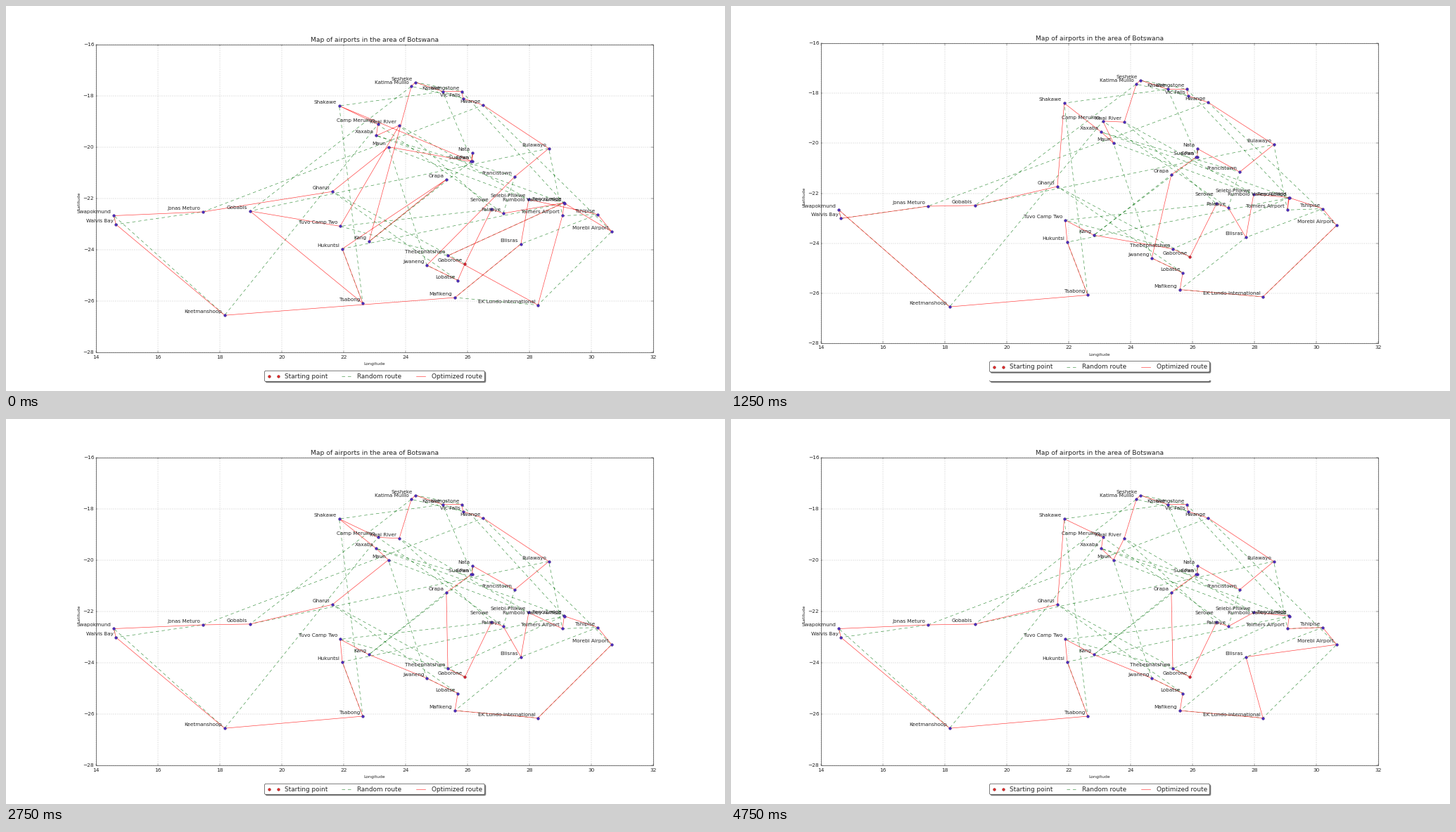
A matplotlib script that plays this animation: 1022 by 548 pixels, repeating every 5000 ms.

```python
import matplotlib.pyplot as plt
from matplotlib.animation import FuncAnimation
from matplotlib.patches import FancyBboxPatch, Rectangle

WIDTH, HEIGHT, DPI = 1022, 548, 64
SHORT_HEIGHT = 533
PT = 72 / DPI
LEFT, RIGHT = 0.125 * WIDTH, 0.9 * WIDTH
RED, GREEN, INK = "#ff3a3a", "#3f9445", "#262626"

# Listed in the order of the best tour.
AIRPORTS = [
    ("Gaborone", 25.92, -24.55), ("Serowe", 26.78, -22.42),
    ("Palapye", 27.16, -22.58), ("Selebi-Phikwe", 27.98, -22.04),
    ("Feno Lodge", 29.11, -22.17), ("Rumbolo Valley Airfield", 29.13, -22.18),
    ("Tolmers Airport", 29.07, -22.67), ("Tshipise", 30.21, -22.62),
    ("Morebi Airport", 30.66, -23.29), ("Ellisras", 27.73, -23.77),
    ("EK Lundo International", 28.28, -26.15), ("Mafikeng", 25.60, -25.86),
    ("Lobatse", 25.69, -25.19), ("Jwaneng", 24.69, -24.60),
    ("Kang", 22.82, -23.68), ("Tuvo Camp Two", 21.89, -23.08),
    ("Hukuntsi", 21.96, -23.96), ("Tsabong", 22.62, -26.08),
    ("Keetmanshoop", 18.16, -26.55), ("Walvis Bay", 14.65, -23.01),
    ("Swapokmund", 14.58, -22.67), ("Jonas Meturo", 17.46, -22.52),
    ("Gobabis", 18.98, -22.49), ("Ghanzi", 21.64, -21.73),
    ("Shakawe", 21.86, -18.39), ("Camp Merulino", 23.11, -19.11),
    ("Xaxaba", 23.06, -19.55), ("Maun", 23.45, -19.99),
    ("Kwai River", 23.80, -19.15), ("Katima Mulilo", 24.19, -17.63),
    ("Sesheke", 24.32, -17.47), ("Kasane", 25.20, -17.83),
    ("Livingstone", 25.82, -17.83), ("Vic Falls", 25.86, -18.10),
    ("Hwange", 26.51, -18.36), ("Bulawayo", 28.63, -20.05),
    ("Francistown", 27.53, -21.15), ("Nata", 26.17, -20.22),
    ("Sowa", 26.16, -20.56), ("Sua Pan", 26.12, -20.56),
    ("Orapa", 25.32, -21.26), ("Thebephatshwa", 25.37, -24.23),
]
LABEL_LIFT = {"Serowe": 11.5}


def tour(*parts):
    """Join single stops and inclusive (first, last) runs into one list."""
    stops = []
    for part in parts:
        if isinstance(part, tuple):
            first, last = part
            step = 1 if last > first else -1
            stops += range(first, last + step, step)
        else:
            stops.append(part)
    return stops


def rewire(stops, *run):
    """Put a contiguous run of stops into a new order."""
    start = min(stops.index(stop) for stop in run)
    return stops[:start] + list(run) + stops[start + len(run):]


RANDOM_ROUTE = tour(0, 23, 12, 13, 27, 3, 28, 1, 15, 41, 4, 32, 30, 33, 29,
                    22, 35, 6, 7, 9, 11, 10, 8, 34, 21, 19, 20, 18, 25, 2,
                    36, 26, 5, 16, 17, 24, 31, 38, 37, 39, 14, 40)

rough = tour(0, 12, 13, (36, 29), 14, 40, 16, 17, 22, 15, 28, 26, 25, 24,
             38, 37, 39, 27, 23, (21, 18), 11, 9, 3, 7, 8, 5, 6, 10, 41,
             4, 2, 1)
west = tour(11, 14, 23, (15, 18), 22, (19, 21), (24, 28))
untangled = tour(0, 12, 13, 41, 10, 6, 4, 5, 3, 7, 8, 2, 9) + west + tour(
    39, (29, 38), 40, 1)
crossed = tour(0, 12, 13, 41, 10, (3, 8), 2, 9) + west + tour(
    39, 33, (29, 32), 34, 37, 35, 36, 38, 40, 1)
opened = tour(0, 1, 2, 9, (3, 8), (10, 13), 41, 14, 23, (15, 18), 22,
              (19, 21), (24, 40))
looped = tour(0, 1, 2, 9, 3, 4, 6, 5, 7, 8, (10, 13), (40, 28), 25, 27, 26,
              (24, 14), 41)
looped_west = rewire(looped, 19, 20)

best = tour((0, 41))
near_best = rewire(best, 6, 5, 4)
with_detour = rewire(near_best, 9, 3, 6, 5, 4, 7, 8)
delta_swap = rewire(with_detour, 24, 26, 27, 25)
delta_zigzag = rewire(with_detour, 27, 26, 24, 25)
valley_zigzag = rewire(delta_zigzag, 4, 6, 5)
coast_swap = rewire(valley_zigzag, 20, 19)
pan_swap = rewire(coast_swap, 38, 37, 39)

# (tour, number of quarter seconds it stays)
SCHEDULE = [
    (rough, 1), (untangled, 1), (crossed, 1), (opened, 1), (looped, 1),
    (looped_west, 1), (pan_swap, 1), (coast_swap, 1), (valley_zigzag, 3),
    (delta_zigzag, 1), (delta_swap, 1), (with_detour, 1), (near_best, 2),
    (rewire(best, 5, 4), 3), (best, 1),
]
TIMELINE = [stops for stops, count in SCHEDULE for _ in range(count)]

# The coast swap happens together with a shorter canvas.
SHORT_STEP = TIMELINE.index(looped_west)
TIMELINE[SHORT_STEP] = rewire(looped_west, 19, 20)

plt.rcParams["font.family"] = "DejaVu Sans"
fig = plt.figure(figsize=(WIDTH / DPI, HEIGHT / DPI), dpi=DPI, facecolor="white")
ax = fig.add_axes([0, 0, 1, 1])


def write(x, y, text, size, ha="center", va="center", **kwargs):
    ax.text(x, y, text, fontsize=size * PT, ha=ha, va=va, color=INK, **kwargs)


def line(xs, ys, color, width=0.65, **kwargs):
    ax.plot(xs, ys, color=color, lw=width * PT, **kwargs)


def dots(xs, ys, color, edge):
    ax.plot(xs, ys, "o", ms=3.7 * PT, mfc=color, mec=edge, mew=0.4 * PT, zorder=2.6)


def project(lon, lat, height):
    x = LEFT + (lon - 14) / 18 * (RIGHT - LEFT)
    y = height * (0.1 + 0.8 * (-16 - lat) / 12)
    return x, y


def draw_route(stops, height, color, **kwargs):
    points = [project(*AIRPORTS[i][1:], height) for i in stops]
    line(*zip(*points), color, **kwargs)


def draw_axes(height):
    top, bottom = 0.1 * height, 0.9 * height
    ax.add_patch(Rectangle((LEFT, top), RIGHT - LEFT, bottom - top, fill=False,
                           ec="#333333", lw=0.65 * PT, zorder=2.5))
    dotted = dict(color="#8c8c8c", width=0.45, ls=(0, (2, 4)), zorder=1.5)
    for lon in range(14, 33, 2):
        x, _ = project(lon, -16, height)
        line([x, x], [top, bottom], **dotted)
        for y, tick in ((top, 2.5), (bottom, -2.5)):
            line([x, x], [y, y + tick], INK, 0.4)
        write(x, bottom + 6.3, str(lon), 7.4)
    for lat in range(-28, -15, 2):
        _, y = project(14, lat, height)
        line([LEFT, RIGHT], [y, y], **dotted)
        for x, tick in ((LEFT, 2.5), (RIGHT, -2.5)):
            line([x, x + tick], [y, y], INK, 0.4)
        write(LEFT - 2.5, y, f"\u2212{-lat}", 7.4, ha="right")
    middle = (LEFT + RIGHT) / 2
    write(middle, top - 6.5, "Map of airports in the area of Botswana", 9.18)
    write(middle, bottom + 16.8, "Longitude", 6.1)
    write(103.8, (top + bottom) / 2 + 3.5, "Latitude", 6.1, rotation=90)


def legend_box(height, zorder):
    top = 0.9 * height + 26
    for shift, face, edge in ((1.5, "#7f7f7f", "#7f7f7f"), (0, "white", INK)):
        ax.add_patch(FancyBboxPatch(
            (369.5 + shift, top + 2 + shift), 309, 11.3,
            boxstyle="round,pad=2,rounding_size=2", fc=face, ec=edge,
            lw=0.6 * PT, zorder=zorder))


def draw_legend(height):
    legend_box(height, 2)
    y = 0.9 * height + 33.8
    dots([374, 386.5], [y, y], "#e02a2a", "#7a1414")
    line([477, 490], [y, y], GREEN, ls=(0, (7, 6)), zorder=2.6)
    line([583, 596], [y, y], RED, zorder=2.6)
    for x, text in ((396, "Starting point"), (499, "Random route"),
                    (605, "Optimized route")):
        write(x, y, text, 8.82, ha="left", va="center")


def draw_airports(height):
    for i, (name, lon, lat) in enumerate(AIRPORTS):
        x, y = project(lon, lat, height)
        dots([x], [y], *(("#d8232f", "#6e1428") if i == 0 else ("#4a2cc0", "#3a1668")))
        write(x - 3.7, y - LABEL_LIFT.get(name, 3), name, 7.3, ha="right", va="baseline")


def draw(step):
    ax.clear()
    ax.set(xlim=(0, WIDTH), ylim=(HEIGHT, 0))
    ax.axis("off")
    height = SHORT_HEIGHT if step == SHORT_STEP else HEIGHT
    if height < HEIGHT:
        # The strip below the shorter canvas still shows the earlier legend.
        legend_box(HEIGHT, 0.5)
        ax.add_patch(Rectangle((0, 0), WIDTH, height, fc="white", lw=0, zorder=1))
    draw_axes(height)
    draw_route(RANDOM_ROUTE, height, GREEN, ls=(0, (7, 6)), zorder=2.1)
    stops = TIMELINE[step]
    draw_route(stops + stops[:1], height, RED, zorder=2.2)
    draw_airports(height)
    draw_legend(height)


anim = FuncAnimation(fig, draw, frames=len(TIMELINE), interval=250,
                     init_func=lambda: None, repeat=True, repeat_delay=0)
plt.show()
```
